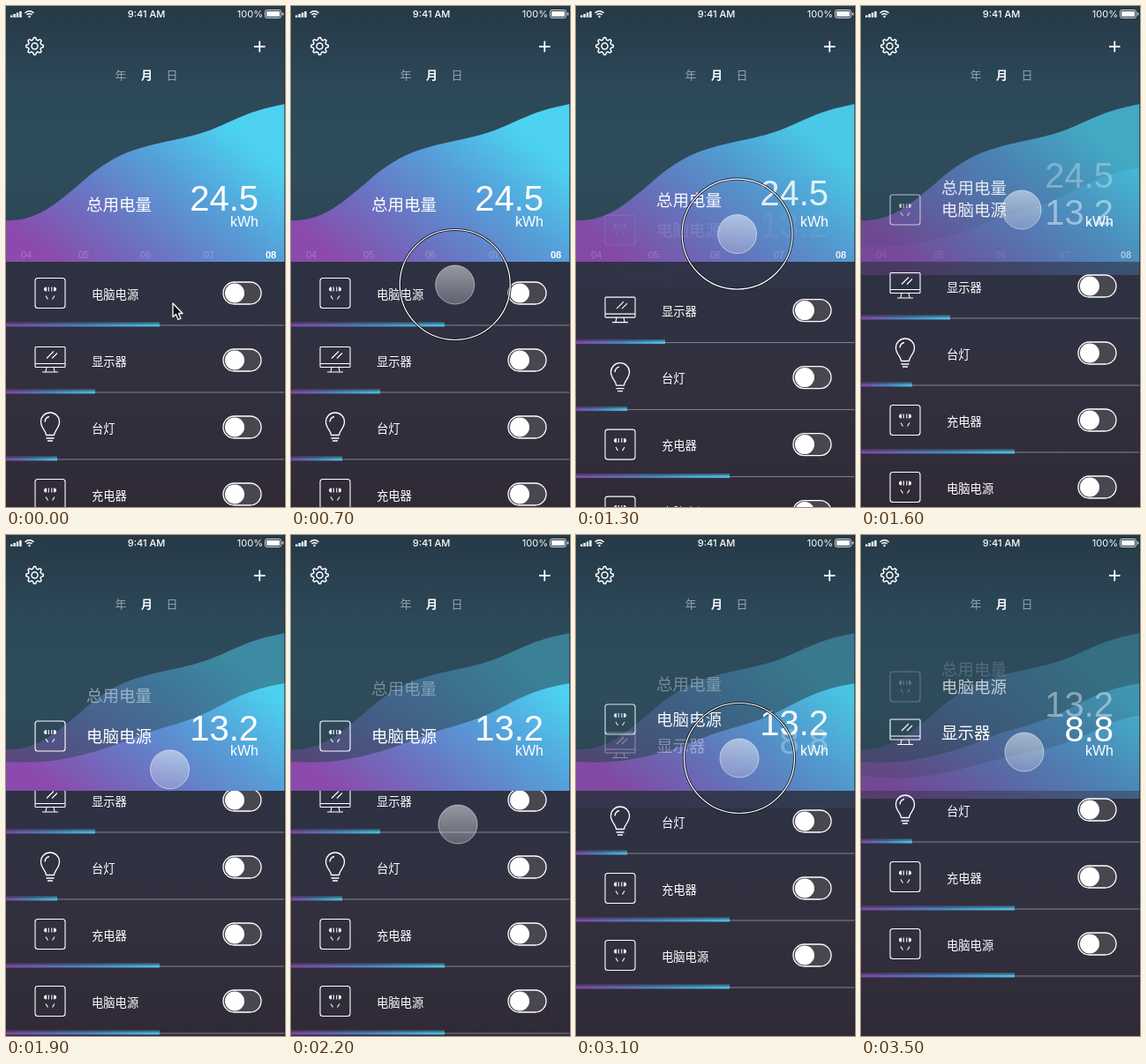
Write an HTML page with a canvas that moves like this. It is 316 px wide and 568 px high and loops after 3600 ms.

```html
<!DOCTYPE html>
<html lang="zh-CN">
<head>
<meta charset="utf-8">
<style>
html, body { margin: 0; width: 100%; height: 100%; overflow: hidden; background: #2c4353; }
canvas { display: block; width: 316px; height: 568px; }
</style>
</head>
<body>
<canvas id="stage" width="316" height="568"></canvas>
<script>
const W = 316, H = 568, PANEL = 290, LOOP = 3600, STEP = 100;
const c = document.getElementById('stage').getContext('2d');
const CJK = '"Noto Sans CJK SC", "Noto Sans CJK", sans-serif';
const LATIN = '"Liberation Sans", Arial, sans-serif';

// Piecewise-linear track: time, value, time, value, ...
function at(t, k) {
  if (t <= k[0]) return k[1];
  for (let i = 2; i < k.length; i += 2)
    if (t <= k[i]) return k[i - 1] + (k[i + 1] - k[i - 1]) * (t - k[i - 2]) / (k[i] - k[i - 2]);
  return k[k.length - 1];
}

function gradient(x0, y0, x1, y1, stops) {
  const g = c.createLinearGradient(x0, y0, x1, y1);
  stops.forEach((s, i) => g.addColorStop(i / (stops.length - 1), s));
  return g;
}

function text(s, x, y, font, align = 'left', alpha = 1) {
  c.globalAlpha = alpha;
  c.font = font;
  c.textAlign = align;
  c.textBaseline = 'middle';
  c.fillStyle = '#fff';
  c.fillText(s, x, y);
  c.globalAlpha = 1;
}

function stroke(d, width = 1.1) {
  c.lineWidth = width;
  c.strokeStyle = '#fff';
  c.stroke(new Path2D(d));
}

function disc(x, y, r, fill) {
  c.beginPath();
  c.arc(x, y, r, 0, 7);
  c.fillStyle = fill;
  c.fill();
}

function box(x, y, w, h, r) {
  c.beginPath();
  c.roundRect(x, y, w, h, r);
}

const icons = {
  socket() {
    box(-17, -17, 34, 34, 3);
    c.lineWidth = 1.1;
    c.strokeStyle = '#fff';
    c.stroke();
    c.fillStyle = '#fff';
    c.fill(new Path2D('M-4 -7V-2Q-7 -2 -7 -4.5T-4 -7ZM4 -7V-2Q7 -2 7 -4.5T4 -7Z'));
    stroke('M-1.8 -7V-2M1.8 -7V-2M-5 3L-2.5 7M5 3L2.5 7');
  },
  monitor() {
    stroke('M-16 -15H16Q17 -15 17 -14V7Q17 8 16 8H-16Q-17 8 -17 7V-14Q-17 -15 -16 -15ZM-17 4H17M-4 8L-5 13M4 8L5 13M-9 13.5H9M-4 -2L4 -10M2 -2L8 -8');
  },
  bulb() {
    stroke('M-4.5 9C-4.5 4 -10.5 1 -10.5 -6A10.5 10.5 0 0 1 10.5 -6C10.5 1 4.5 4 4.5 9ZM-4.5 12.5H4.5M-3 15.5H3M-6 -6Q-5.5 -11 -1 -12', 1.3);
  }
};

function icon(name, x, y, alpha = 1) {
  c.save();
  c.translate(x, y);
  c.globalAlpha = alpha;
  icons[name]();
  c.restore();
}

const rows = [
  ['电脑电源', 'socket', 174],
  ['显示器', 'monitor', 101],
  ['台灯', 'bulb', 58],
  ['充电器', 'socket', 174],
  ['电脑电源', 'socket', 174]
];

const heads = [
  {
    label: '总用电量', value: '24.5',
    wave: [0, 243, 14, 244, 45, 233, 80, 205, 100, 187, 130, 168, 165, 157, 200, 150, 230, 142, 260, 128, 285, 118, 316, 111],
    y: [1200, 225, 1600, 206, 2000, 174, 2600, 173, 3100, 169, 3500, 152],
    alpha: [1200, 1, 1600, .85, 2000, .35, 3100, .35, 3500, .18],
    numY: [1200, 220, 1600, 194, 1900, 172],
    numAlpha: [1200, 1, 1600, .3, 1900, 0],
    waveY: [0, 0],
    waveAlpha: [1200, 1, 1600, .7, 2000, .4, 2800, .4, 3500, .27]
  },
  {
    label: '电脑电源', value: '13.2', icon: 'socket',
    wave: [0, 257, 30, 259, 75, 253, 120, 240, 155, 225, 195, 214, 225, 203, 260, 184, 290, 173, 316, 168],
    y: [1200, 262, 1600, 231, 1900, 228, 2700, 228, 3100, 209, 3500, 172],
    alpha: [1250, 0, 1600, .88, 1900, 1, 3000, 1, 3500, .7],
    iconAlpha: [1250, 0, 1600, .65, 1900, 1, 2900, 1, 3100, .85, 3500, .25],
    numY: [1200, 255, 1600, 236, 1900, 221, 2800, 221, 3100, 215, 3500, 194],
    numAlpha: [1250, 0, 1600, .45, 1900, 1, 3000, 1, 3100, .92, 3500, .42],
    waveY: [1200, 34, 1600, 15, 1900, 0],
    waveAlpha: [1250, 0, 1600, .3, 1900, 1, 2800, 1, 3100, .85, 3500, .4]
  },
  {
    label: '显示器', value: '8.8', icon: 'monitor',
    wave: [0, 264, 40, 268, 90, 263, 140, 249, 185, 238, 225, 230, 260, 215, 290, 201, 316, 195],
    y: [2800, 260, 3100, 239, 3500, 224],
    alpha: [2800, 0, 3100, .35, 3400, 1],
    numY: [2800, 255, 3100, 236, 3500, 222],
    numAlpha: [2800, 0, 3100, .28, 3400, 1],
    waveY: [2800, 34, 3100, 20, 3500, 9],
    waveAlpha: [2800, 0, 3100, .1, 3500, .42]
  }
];

const scroll = [800, 0, 1100, 38, 1600, 84, 1900, 101, 2400, 101, 2600, 103, 3100, 153, 3500, 166];
const touchX = [100, 190, 800, 185, 1100, 183, 1600, 182, 2200, 189, 2600, 188, 3100, 185];
const touchY = [100, 343, 500, 318, 800, 315, 1100, 277, 1600, 231, 1800, 245, 2200, 328, 2600, 327, 3100, 253, 3500, 246];

function drawWave(h, t) {
  const p = h.wave, n = p.length;
  c.save();
  c.globalAlpha = at(t, h.waveAlpha);
  c.translate(0, at(t, h.waveY));
  c.beginPath();
  c.moveTo(0, PANEL);
  c.lineTo(p[0], p[1]);
  for (let i = 2; i < n - 2; i += 2)
    c.quadraticCurveTo(p[i], p[i + 1], (p[i] + p[i + 2]) / 2, (p[i + 1] + p[i + 3]) / 2);
  c.lineTo(p[n - 2], p[n - 1]);
  c.lineTo(W, PANEL);
  c.fillStyle = gradient(80, 310, 230, 120, ['#8b4aac', '#6a74c2', '#559fd9', '#4cd2f0']);
  c.fill();
  c.restore();
}

function drawHead(h, t) {
  const y = at(t, h.y);
  if (h.icon) icon(h.icon, 50, y, at(t, h.iconAlpha || h.alpha));
  text(h.label, 91, y, '500 18.5px ' + CJK, 'left', at(t, h.alpha));
  text(h.value, 286, at(t, h.numY) + 1, '40px ' + LATIN, 'right', at(t, h.numAlpha));
}

function drawRow([label, name, width], y) {
  icon(name, 50, y);
  text(label, 97, y + 1, '13.3px ' + CJK);
  box(246, y - 12.5, 43, 25, 12.5);
  c.fillStyle = '#48474f';
  c.fill();
  c.lineWidth = 1.3;
  c.strokeStyle = '#fff';
  c.stroke();
  disc(259, y, 11, '#fff');
  const line = y + 36;
  c.fillStyle = '#85838f';
  c.fillRect(0, line, W, 1);
  c.fillStyle = gradient(0, 0, width, 0, ['#8047a5', '#4a83bd', '#49bfde']);
  c.globalAlpha = .5;
  c.fillRect(0, line - 3, width, 2);
  c.globalAlpha = 1;
  c.fillRect(0, line - 1, width, 3);
}

function drawTopBar() {
  c.fillStyle = '#fff';
  for (let i = 0; i < 4; i++) c.fillRect(5 + i * 3.4, 10.5 - i * 1.5, 2.4, 2.5 + i * 1.5);
  stroke('M21.5 8Q26.5 3.5 31.5 8M23.5 10Q26.5 7.5 29.5 10', 1.5);
  disc(26.5, 12, 1.2, '#fff');
  text('9:41 AM', 159, 9.5, '500 11px Inter, sans-serif', 'center');
  text('100%', 291, 9.5, '11px Inter, sans-serif', 'right');
  box(293.5, 4.5, 18, 9, 2);
  c.lineWidth = .8;
  c.stroke();
  c.fillRect(295, 6, 15, 6);
  c.fillRect(313, 7.5, 1.2, 3);

  // Gear outline
  c.beginPath();
  for (let i = 0; i < 32; i++) {
    const a = (i - .5) * Math.PI / 16, r = i % 4 < 2 ? 9.8 : 7.4;
    c.lineTo(32.5 + r * Math.cos(a), 45.5 + r * Math.sin(a));
  }
  c.closePath();
  c.lineWidth = 1.5;
  c.lineJoin = 'round';
  c.stroke();
  c.beginPath();
  c.arc(32.5, 45.5, 3.5, 0, 7);
  c.stroke();
  stroke('M281 46H293.5M287.25 39.8V52.2', 1.8);

  text('年', 130, 78, '13px ' + CJK, 'center', .5);
  text('月', 159.5, 78, 'bold 13px ' + CJK, 'center');
  text('日', 188, 78, '13px ' + CJK, 'center', .5);
}

function drawPointer(t) {
  if (t < 100) {
    const arrow = new Path2D('M189 337V352.5L192.5 349.5L195 355.5L198 354.2L195.5 348.5H200Z');
    c.fillStyle = '#111';
    c.fill(arrow);
    c.lineWidth = 1.3;
    c.strokeStyle = '#fff';
    c.stroke(arrow);
    return;
  }
  const x = at(t, touchX), y = at(t, touchY);
  disc(x, y, 22, gradient(0, y - 22, 0, y + 22, ['rgba(255,255,255,.5)', 'rgba(225,225,235,.28)']));
  c.lineWidth = 1;
  c.strokeStyle = 'rgba(255,255,255,.5)';
  c.stroke();
  const pressed = t >= 700 && t < 1400 || t >= 2400 && t < 3300;
  if (!pressed) return;
  c.beginPath();
  c.arc(x, y, 62.5, 0, 7);
  c.lineWidth = 3;
  c.strokeStyle = 'rgba(15,18,25,.85)';
  c.stroke();
  c.lineWidth = 1.2;
  c.strokeStyle = '#fff';
  c.stroke();
}

function draw(t) {
  c.fillStyle = gradient(0, 0, 0, PANEL, ['#263946', '#2c495a', '#2e4c5c', '#2c414f']);
  c.fillRect(0, 0, W, PANEL);
  c.fillStyle = gradient(0, PANEL, 0, H, ['#2d3243', '#32303f', '#302a37']);
  c.fillRect(0, PANEL, W, H - PANEL);

  heads.forEach(h => drawWave(h, t));
  const months = at(t, [1200, 1, 1600, .55, 1900, 0]);
  [23, 88, 158, 230].forEach((x, i) =>
    text('0' + (i + 4), x, 283, '11px ' + LATIN, 'center', .25 * months));
  text('08', 300, 283, 'bold 11px ' + LATIN, 'center', months);

  c.save();
  c.beginPath();
  c.rect(0, PANEL, W, H - PANEL);
  c.clip();
  const passed = t < 1300 ? 0 : t < 2900 ? 1 : 2;
  rows.forEach((r, i) => {
    if (i >= passed) drawRow(r, 325.5 + i * 76 - at(t, scroll));
  });
  c.restore();

  heads.forEach(h => drawHead(h, t));
  text('kWh', 286, 246, '16px ' + LATIN, 'right');
  drawTopBar();
  c.fillStyle = 'rgba(30,38,48,.6)';
  c.fillRect(W - 1, 0, 1, H);
  drawPointer(t);
}

const start = performance.now();
function frame() {
  const t = (performance.now() - start) % LOOP;
  draw(Math.floor(t / STEP) * STEP);
  requestAnimationFrame(frame);
}
frame();
</script>
</body>
</html>
```
